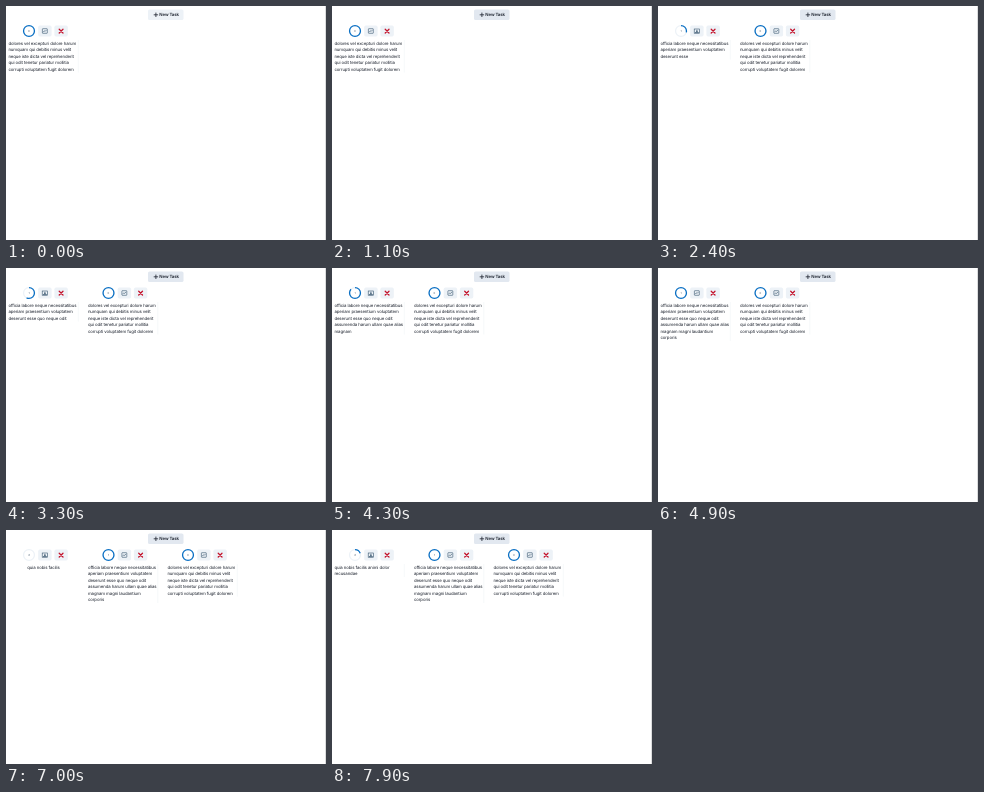
An HTML page for the animation above (8 s loop, 320 by 234 pixels).

```html
<!DOCTYPE html>
<html lang="en">
<head>
<meta charset="utf-8">
<title>Task board</title>
<style>
html, body { margin: 0; width: 100%; height: 100%; overflow: hidden; background: #fff; }
svg { display: block; width: 100%; height: 100%; }
text {
  font: 400 4.33px Inter, "Open Sans", sans-serif;
  letter-spacing: -.022em;
  fill: #1a202c;
  text-rendering: geometricPrecision;
}
.title { font-weight: 600; }
.label { font-size: 2.8px; text-anchor: middle; fill: #3f566b; letter-spacing: 0; }
.button { fill: #edf2f7; }
.ring { fill: none; stroke-width: 1.3; }
.track { stroke: #edf2f7; }
.bar { stroke: #0b70c4; }
.icon { fill: none; stroke: #34536c; stroke-width: .6; }
.cross { stroke: #c4122b; stroke-width: 1.25; stroke-linecap: round; }
.edge { stroke: #edf0f4; stroke-width: .5; }
</style>
</head>
<body>
<svg viewBox="0 0 320 234">
  <defs>
    <g id="controls">
      <rect class="button" x="32.2" y="19.6" width="13.4" height="10.8" rx="1.6"/>
      <rect class="button" x="48.4" y="19.6" width="13.4" height="10.8" rx="1.6"/>
      <path class="cross" d="M53.2 23.2l3.8 3.8m0-3.8l-3.8 3.8"/>
      <circle class="ring track" cx="23" cy="25" r="5.46"/>
    </g>
    <g id="busy" class="icon">
      <rect x="36.2" y="23" width="5.4" height="4.2"/>
      <path d="M37 26.6h3.8M38 25.4h1.8M38.9 23.8v1.6" stroke-width=".8"/>
    </g>
    <g id="done" class="icon">
      <rect x="36.4" y="22.7" width="4.9" height="4.6" rx=".4"/>
      <path d="M37.1 26.2l1.2-1.4.8.7 1.4-1.6"/>
    </g>
  </defs>
  <path d="M319.6 0V234" stroke="#c9cacc" stroke-width=".7"/>
  <rect id="newTask" x="142" y="3.4" width="35.5" height="10.6" rx="1.6"/>
  <path d="M149.9 6.6v4.4m-2.2-2.2h4.4" stroke="#1a202c" stroke-width=".8"/>
  <text class="title" x="153.3" y="10.4">New Task</text>
  <g id="board"></g>
</svg>
<script>
const LOOP = 8000, CHUNK_MS = 500, CHUNK_WORDS = 3, FADE_MS = 600;
const COLUMN = 79.5, LINE = 6.5, CIRCLE = 2 * Math.PI * 5.46;

const tasks = [
  { born: -9000, chunks: 8, lines: [
    "dolores vel excepturi dolore harum", "numquam qui debitis minus velit",
    "neque iste dicta vel reprehenderit", "qui odit tenetur pariatur mollitia",
    "corrupti voluptatem fugit dolorem"] },
  { born: 1400, chunks: 7, lines: [
    "officia labore neque necessitatibus", "aperiam praesentium voluptatem",
    "deserunt esse quo neque odit", "assumenda harum ullam quae alias",
    "magnam magni laudantium", "corporis"] },
  { born: 7000, chunks: 10, lines: ["quia nobis facilis animi dolor", "recusandae"] }
];

const clamp = x => Math.min(1, Math.max(0, x));

// cubic-bezier(.25, .1, .25, 1)
function ease(x) {
  if (x <= 0 || x >= 1) return clamp(x);
  let lo = 0, hi = 1, u;
  for (let i = 0; i < 18; i++) {
    u = (lo + hi) / 2;
    const bx = .75 * u * (1 - u) + u ** 3;
    if (bx < x) lo = u; else hi = u;
  }
  return .3 * u * (1 - u) ** 2 + 3 * u * u * (1 - u) + u ** 3;
}

function add(parent, name, attrs = {}) {
  const node = document.createElementNS("http://www.w3.org/2000/svg", name);
  for (const key in attrs) node.setAttribute(key, attrs[key]);
  return parent.appendChild(node);
}

const board = document.getElementById("board");
const newTask = document.getElementById("newTask");

tasks.forEach((task, id) => {
  const group = task.group = add(board, "g");
  add(group, "use", { href: "#controls" });
  task.bar = add(group, "circle", {
    class: "ring bar", cx: 23, cy: 25, r: 5.46, transform: "rotate(-90 23 25)"
  });
  add(group, "text", { class: "label", x: 23, y: 26 }).textContent = id;
  task.icon = add(group, "use");
  task.edge = add(group, "path", { class: "edge" });
  task.rows = task.lines.map((_, i) => add(group, "text", { y: 38.5 + i * LINE }));
});

function drawTask(task, column, t) {
  const age = t - task.born;
  task.group.setAttribute("visibility", age < 0 ? "hidden" : "visible");
  if (age < 0) return;
  task.group.setAttribute("transform", `translate(${column * COLUMN} 0)`);

  const count = Math.min(task.chunks, Math.floor(age / CHUNK_MS) + 1);
  let progress = 0;
  for (let i = 0; i < count; i++) progress += ease((age - i * CHUNK_MS) / FADE_MS);
  progress /= task.chunks;
  task.bar.setAttribute("stroke-dasharray", `${progress * CIRCLE} ${CIRCLE * 2}`);
  task.icon.setAttribute("href", count < task.chunks ? "#busy" : "#done");

  let words = count * CHUNK_WORDS, shown = 0;
  const short = count === 1;
  task.rows.forEach((row, i) => {
    const part = task.lines[i].split(" ").slice(0, words);
    words -= part.length;
    if (part.length) shown++;
    row.textContent = part.join(" ");
    row.setAttribute("x", short ? 37.5 : 2.4);
    row.setAttribute("text-anchor", short ? "middle" : "start");
  });
  task.edge.setAttribute("d", short ? "" : `M72.3 34v${shown * LINE}`);
}

function render(t) {
  const hover = clamp((t - 750) / 350);
  const mix = (a, b) => Math.round(a + (b - a) * hover);
  newTask.setAttribute("fill", `rgb(${mix(237, 226)},${mix(242, 232)},${mix(247, 240)})`);
  tasks.forEach((task, i) => {
    const newer = tasks.slice(i + 1).filter(other => t >= other.born).length;
    drawTask(task, newer, t);
  });
}

const start = performance.now();
function tick() {
  render((performance.now() - start) % LOOP);
  requestAnimationFrame(tick);
}
tick();
</script>
</body>
</html>
```
